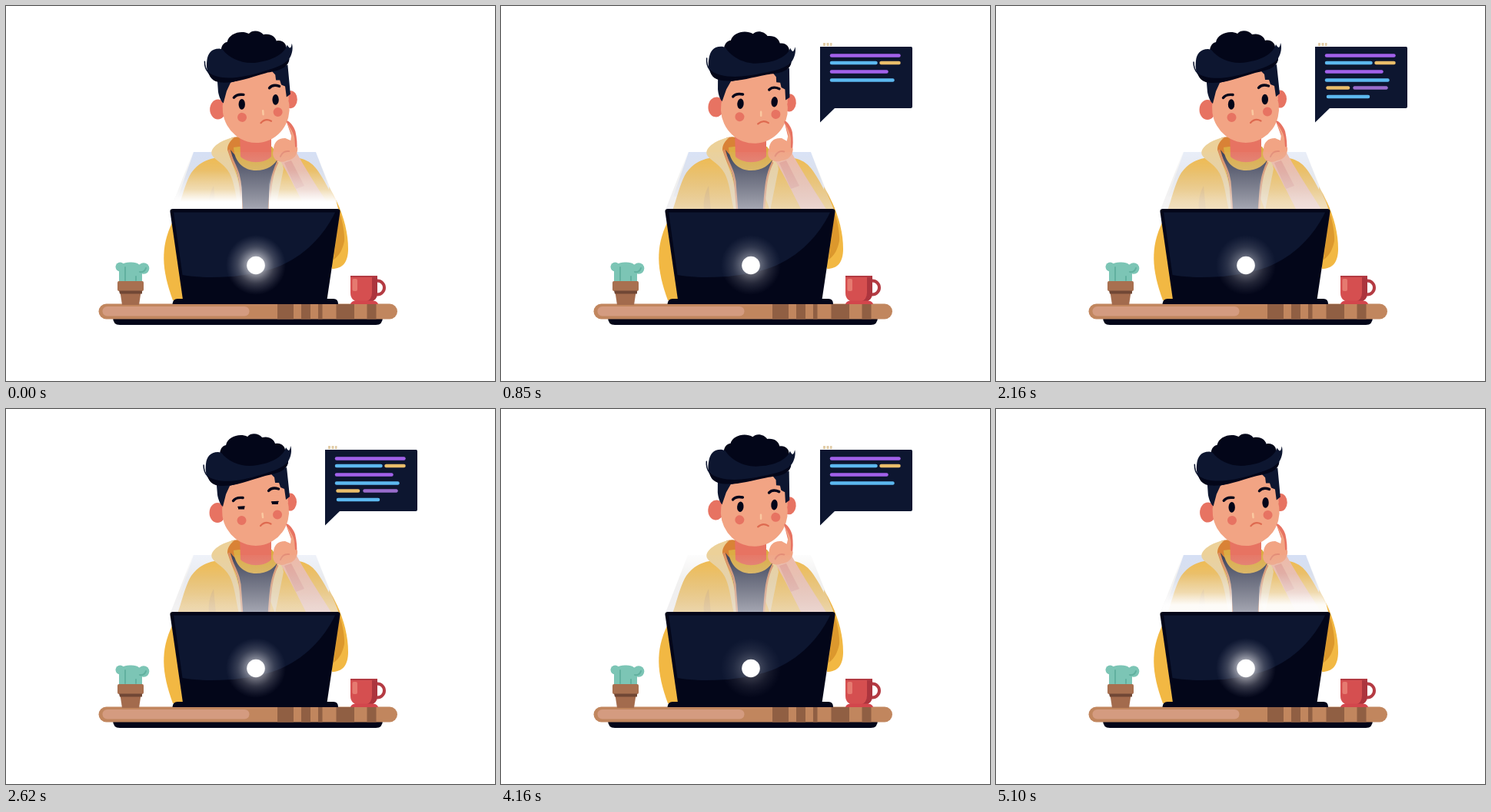
These frames come from a looping animation (636x488 px, 5.17 s). An HTML page:

```html
<!DOCTYPE html>
<html lang="en">
<head>
<meta charset="utf-8">
<title>Thinking at the laptop</title>
<style>
  html, body { margin: 0; width: 100%; height: 100%; overflow: hidden; background: #fff; }
  svg { display: block; width: 100%; height: 100%; }
  .navy { fill: #0d1630; }
  .black { fill: #030619; }
  .skin { fill: #f2a484; }
  .coral { fill: #e77362; }
  .yellow { fill: #f2b843; }
  .cream { fill: #ecd199; }
  .line { fill: none; stroke-linecap: round; stroke-linejoin: round; }
</style>
</head>
<body>
<svg viewBox="0 0 636 488">
  <defs>
    <linearGradient id="beam" gradientUnits="userSpaceOnUse" x1="0" y1="188" x2="0" y2="260">
      <stop offset="0" stop-color="#d5e0f7"/>
      <stop offset=".5" stop-color="#dce5f8"/>
      <stop offset="1" stop-color="#fff"/>
    </linearGradient>
    <linearGradient id="tint" gradientUnits="userSpaceOnUse" x1="0" y1="190" x2="0" y2="264">
      <stop offset="0" stop-color="#d4d2cf" stop-opacity=".05"/>
      <stop offset=".4" stop-color="#d6d4d2" stop-opacity=".32"/>
      <stop offset="1" stop-color="#e8e7ea" stop-opacity=".62"/>
    </linearGradient>
    <linearGradient id="haze" gradientUnits="userSpaceOnUse" x1="0" y1="214" x2="0" y2="255">
      <stop offset="0" stop-color="#fff" stop-opacity="0"/>
      <stop offset=".6" stop-color="#fff" stop-opacity=".35"/>
      <stop offset="1" stop-color="#fff"/>
    </linearGradient>
    <radialGradient id="halo">
      <stop offset="0" stop-color="#fff" stop-opacity=".85"/>
      <stop offset=".32" stop-color="#d8d8de" stop-opacity=".65"/>
      <stop offset=".62" stop-color="#a8a9b4" stop-opacity=".32"/>
      <stop offset="1" stop-color="#8085a0" stop-opacity="0"/>
    </radialGradient>
  </defs>

  <path id="back" d="M244 190H403L425 248H224Z" fill="url(#beam)"/>

  <!-- jacket and shirt -->
  <path class="yellow" d="M216 282C201 314 202 342 217 383H234L220 280Z"/>
  <path class="yellow" d="M420 235C436 262 445 290 445 316C445 333 438 342 424 342Z"/>
  <path d="M422 240C435 263 441 292 440 306C437 320 432 326 426 330L434 266Z" fill="#dc982d"/>
  <path class="yellow" d="M290 197C267 195 251 203 241 217C233 230 229 250 223 266H432C425 247 415 228 406 215C398 203 388 197 366 196Z"/>
  <path d="M270 234C264 245 263 256 264 266H273Z" fill="#dca546"/>
  <path d="M282 180C290 170 303 168 309 173L308 205L350 208L352 178L365 174L352 212L342 240V266H306L302 220Z" fill="#d98236"/>
  <path d="M292 187C303 205 338 210 354 195C350 213 342 232 342 266H307C308 235 298 211 292 187Z" fill="#353b55"/>
  <path d="M296 184C297 204 310 214 325 214C340 214 350 207 355 196L346 183H303Z" fill="#dcac43"/>
  <path class="coral" d="M304 165H345V196C335 206 314 205 305 196Z"/>
  <path class="cream" d="M297 171C278 174 264 186 268 194C272 201 284 205 291 218C298 232 299 250 303 266H307C307 232 296 212 288 187C288 180 292 175 297 171Z"/>
  <path class="cream" d="M357 192C350 210 342 228 344 250L350 266L361 212Z"/>
  <path class="line" d="M290 188C295 205 305 215 305 238L307 264M353 204C345 220 344 236 342 264" stroke="#d98c62" stroke-width="2.5"/>

  <!-- head, tilting on the neck -->
  <g id="head">
    <ellipse class="coral" cx="275" cy="135" rx="10.5" ry="13"/>
    <ellipse class="coral" cx="369.5" cy="121" rx="8.5" ry="11.5"/>
    <path class="skin" d="M282 128L280 92L350 78L364 84L367 122Z"/>
    <ellipse class="skin" cx="324.5" cy="133" rx="43.5" ry="45" transform="rotate(-8 324 133)"/>
    <circle class="coral" cx="306.5" cy="145" r="6"/>
    <circle class="coral" cx="353" cy="137.5" r="6"/>
    <g class="black">
      <ellipse cx="306" cy="128" rx="4.2" ry="6.8"/>
      <ellipse cx="349.8" cy="121.5" rx="4.2" ry="6.8"/>
    </g>
    <g id="lids">
      <path class="skin" d="M300 119H312V127H300ZM300 130.500H312V136H300ZM343.500 112.500H356V120.500H343.500ZM343.500 124H356V130H343.500Z"/>
      <path class="line" d="M302 127.500L310 127M345.500 121L354 120.500" stroke="#030619" stroke-width="1.6"/>
    </g>
    <path class="line" d="M295.500 119.500Q299 114.500 308 115.500M341.500 106.500Q346 101 354.500 104" stroke="#030619" stroke-width="3.400"/>
    <path class="line" d="M331 152Q337 145.500 344.500 149.500" stroke="#de6a50" stroke-width="2.200"/>
    <path class="line" d="M333.500 136L334 141" stroke="#fac8a0" stroke-width="2.500"/>
    <path class="navy" d="M273 88L275 112C276 118 279 125 282 127L286 111L291 100L308 94Z"/>
    <path class="navy" d="M344 84L365 76L369 114L364 118L362 104L357 102L355 96L350 96L349 89Z"/>
    <path class="black" d="M278 65C277 51 282 48 286 47C288 36 304 31 314 36C319 30 329 32 333 37C342 35 348 39 350 45C358 43 364 49 363 56L338 82L288 84Z"/>
    <path class="navy" d="M276 56C265 56 261 63 260 71C259 79 260 86 263 90C268 101 284 102 298 98C313 94 332 86 347 83C360 82 367 76 367 68C371 62 372 53 370 48C369 56 367 55 364 50C361 61 347 70 327 73C308 77 289 69 280 57Z"/>
    <path class="line" d="M257 73Q257 82 262 87" stroke="#0d1630" stroke-width="1.500"/>
    <path class="black" d="M262 87C277 99 308 93 330 86C347 81 360 77 367 68C365 83 349 84 337 87C313 94 297 101 278 100C268 99 264 94 262 87Z"/>
  </g>

  <!-- hand -->
  <path d="M353 195L378 191C390 213 407 239 424 266H391C378 240 367 218 353 195Z" fill="#efb8a6"/>
  <path d="M362 204L371 201L388 234L377 238Z" fill="#e5a095"/>
  <g id="hand">
    <path class="coral" d="M364 150C366 147 374 156 376 163C378 172 379 180 378 188L370 183L372 172Z"/>
    <path class="skin" d="M365 152C369 158 374 165 375 172L376 183L379 184C380 193 374 200 366 201C354 207 344 198 348 187C348 178 353 172 363 172L370 175L371 167Z"/>
    <path class="line" d="M357 196Q360 188 368 189" stroke="#e48d77" stroke-width="2"/>
  </g>

  <path d="M243 190H403L433 265H214Z" fill="url(#tint)"/>
  <path id="mist" d="M237 205H409L429 251L432 265H342V232L346 214H302L307 236V265H214Z" fill="url(#haze)"/>

  <!-- desk -->
  <path class="black" d="M139 405H490Q490 415 481 415H148Q139 415 139 405Z"/>
  <rect x="120.500" y="387.500" width="388.500" height="20" rx="10" fill="#c1865e"/>
  <rect x="125.500" y="391" width="191" height="12.500" rx="6.200" fill="#d49b80"/>
  <path d="M353 388h21v19.500h-21zM384 388h12v19.500h-12zM406 388h5.500v19.500h-5.500zM429.500 388h23.500v19.500h-23.500zM469.500 388h12v19.500h-12z" fill="#905f43"/>

  <!-- laptop -->
  <path class="black" d="M217 264H431Q435 264 434.500 268L417.500 382H230L213.500 268Q213 264 217 264Z"/>
  <path class="navy" d="M218 268.500H428C414 298 388 326 352 340C318 353 262 356 229.500 350Z"/>
  <path class="black" d="M216.500 388Q217 381 223 381H426Q432 381 432 388Z"/>
  <circle id="shine" cx="325" cy="337" r="39" fill="url(#halo)"/>
  <circle cx="325" cy="337.500" r="11.800" fill="#fff"/>

  <!-- cactus -->
  <g fill="#7cc5b5">
    <path d="M147 360V345Q148 333 162 333.500Q176 333 177 345V360Z"/>
    <circle cx="148.500" cy="339.500" r="6"/>
    <circle cx="179" cy="341.500" r="7.300"/>
  </g>
  <path class="line" d="M155 340V357M169 352V357M174 346Q180 347 182 341" stroke="#61b09f" stroke-width="2"/>
  <path d="M148 369H176L173 389H151Z" fill="#a36b4d"/>
  <rect x="145" y="358" width="34" height="13" rx="2" fill="#a87050"/>
  <path d="M147 370.500H177V374.500H148Z" fill="#704735"/>

  <!-- cup -->
  <circle cx="483" cy="366.500" r="9" fill="none" stroke="#b43b43" stroke-width="4"/>
  <path d="M448 351H483V373Q483 384 472 385H459Q448 384 448 373Z" fill="#d54f50"/>
  <path d="M476 351H483V373Q483 384 472 385H468Q476 382 476 373Z" fill="#ac353e"/>
  <path d="M448 352H483" stroke="#b23a42" stroke-width="2"/>
  <rect x="450.500" y="355" width="6.500" height="16" rx="2" fill="#e57a70"/>
  <path d="M448 388Q449 384 454 383.500H478Q483 384 484 388Z" fill="#d2464c"/>

  <!-- speech bubble -->
  <g id="bubble">
    <path d="M419 48h3v4h-3zM423.500 48h3v4h-3zM428 48h2.500v4h-2.500z" fill="#e2cda8"/>
    <path class="navy" d="M415 53H533.500Q535 53 535 55V131Q535 133 533 133H434L415 151.500Z"/>
    <g id="code" class="line" stroke-width="4.500"></g>
  </g>
</svg>
<script>
const LOOP = 5170;
const el = id => document.getElementById(id);
const linear = x => x;
const smooth = x => (1 - Math.cos(Math.PI * x)) / 2;

// Value at time t along [time, value] steps.
function track(steps, t, ease = linear) {
  if (t <= steps[0][0]) return steps[0][1];
  for (let i = 1; i < steps.length; i++) {
    const [t0, a] = steps[i - 1], [t1, b] = steps[i];
    if (t < t1) return a + (b - a) * ease((t - t0) / (t1 - t0));
  }
  return steps[steps.length - 1][1];
}

const TILT = [[-250, 0], [800, 1], [2200, 0], [2550, 0], [4000, 1], [5430, 0]];
const BLINK = [[2480, 0], [2580, 1], [2670, 1], [2770, 0]];
const POP = [[300, 0], [480, 1.025], [560, 1]];
const MIST = [[0, 1], [850, 0], [1620, .4], [2620, .1], [3470, .55], [4160, 0], [5100, .92], [LOOP, 1]];
const BEAM = [[0, 1], [850, .9], [1620, .7], [2620, .35], [3470, 1], [4160, 0], [5100, 1]];
const SHINE = [[0, 1], [850, .65], [1620, .3], [2620, .85], [3470, .75], [4160, .35], [5100, 1]];

const PURPLE = '#a261ea', BLUE = '#5cb8ef', GOLD = '#e9bd6a', LILAC = '#996dcc';
// colour, left, right, y, typed at, erased at
const BARS = [
  [PURPLE, 430, 517.5, 64.5, 460, 4860],
  [BLUE, 430, 487.5, 74, 550, 4740],
  [GOLD, 494.5, 517.5, 74, 610, 4680],
  [PURPLE, 430, 501.5, 85.5, 660, 4540],
  [BLUE, 430, 509.5, 96.5, 740, 4400],
  [GOLD, 431.5, 458, 106.5, 960, 3930],
  [LILAC, 466.5, 507.5, 106.5, 1060, 3830],
  [BLUE, 432, 484, 118, 1220, 3680],
].map(([color, left, right, y, on, off]) => {
  const line = document.createElementNS('http://www.w3.org/2000/svg', 'line');
  const attrs = { x1: left, y1: y, y2: y, stroke: color };
  for (const name in attrs) line.setAttribute(name, attrs[name]);
  el('code').append(line);
  return { line, left, right, steps: [[on, 0], [on + 100, 1], [off, 1], [off + 100, 0]] };
});

function draw(t) {
  const tilt = track(TILT, t, smooth);
  el('head').setAttribute('transform', `rotate(${5.2 * tilt} 317 188)`);
  el('hand').setAttribute('transform', `rotate(${6 * tilt} 364 192)`);
  el('lids').setAttribute('opacity', track(BLINK, t) > .5 ? 1 : 0);

  el('back').setAttribute('opacity', track(BEAM, t));
  el('mist').setAttribute('opacity', track(MIST, t));
  el('shine').setAttribute('opacity', track(SHINE, t));

  const pop = t < 5080 ? track(POP, t, smooth) : 0;
  el('bubble').setAttribute('visibility', pop > 0 ? 'visible' : 'hidden');
  el('bubble').setAttribute('transform', `translate(415 151) scale(${pop}) translate(-415 -151)`);
  for (const { line, left, right, steps } of BARS) {
    const typed = track(steps, t);
    line.setAttribute('x2', left + (right - left) * typed);
    line.setAttribute('opacity', typed > 0 ? 1 : 0);
  }
}

const start = performance.now();
function tick() {
  draw((performance.now() - start) % LOOP);
  requestAnimationFrame(tick);
}
tick();
</script>
</body>
</html>
```
